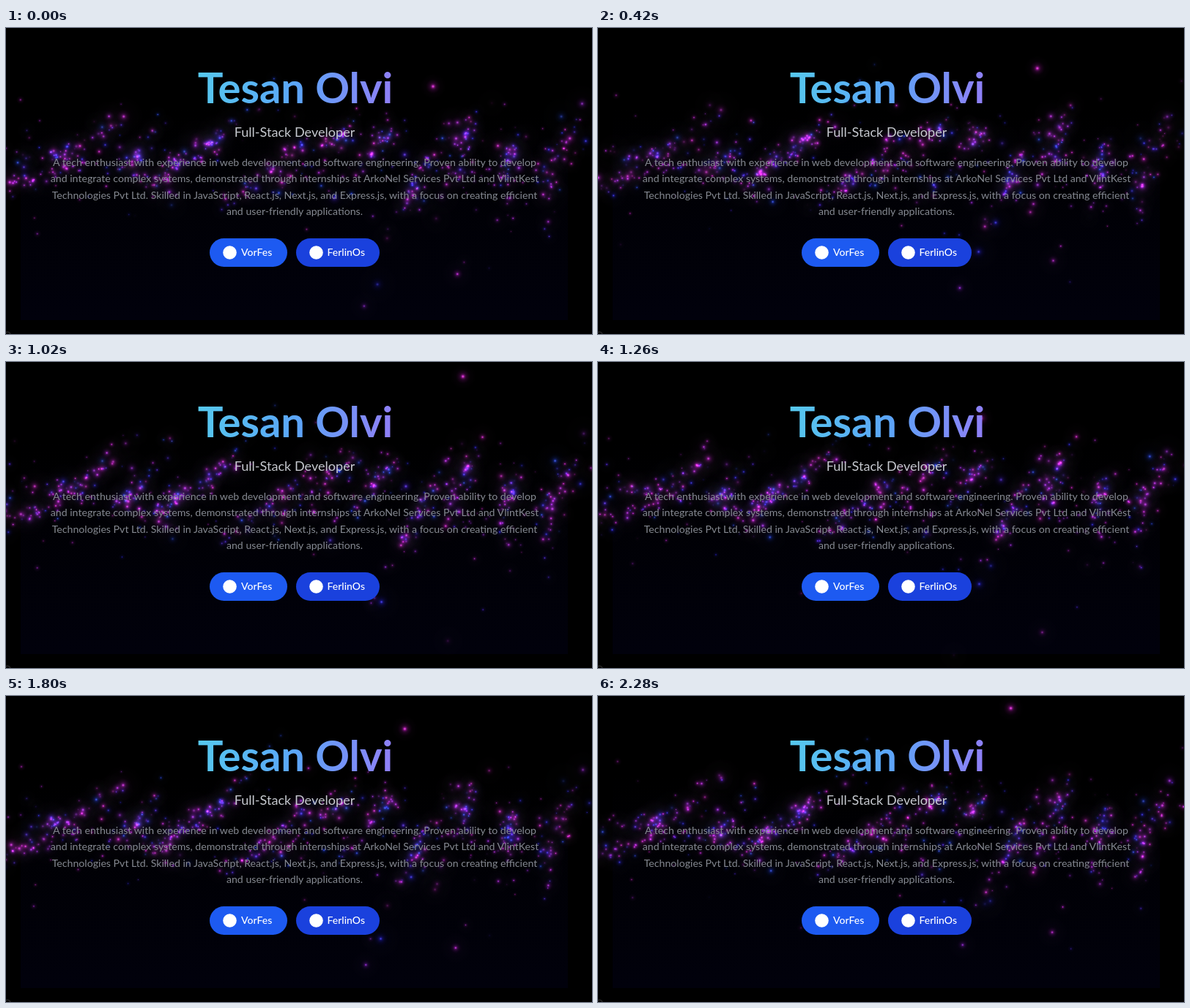
Recreate the animation shown at these times as an HTML page with a canvas. Size 800 by 419 pixels, loop 2.52 s.

```html
<!DOCTYPE html>
<html lang="en">
<head>
<meta charset="utf-8">
<title>Developer hero</title>
<style>
  html, body { margin: 0; width: 100%; height: 100%; overflow: hidden; background: #000; }
  canvas, svg { position: absolute; left: 0; top: 0; width: 800px; height: 419px; display: block; }
  text { font-family: Lato, "Open Sans", sans-serif; }
  .title { font-size: 58px; font-weight: 700; fill: url(#ink); }
  .role { font-size: 18.1px; fill: #c6c9cf; }
  .about { font-size: 14.15px; fill: #858991; }
  .label { font-size: 14px; font-weight: 500; fill: #fff; }
  .mid { text-anchor: middle; }
</style>
</head>
<body>
<canvas id="sky" width="800" height="419"></canvas>
<svg viewBox="0 0 800 419">
  <defs>
    <linearGradient id="ink" gradientUnits="userSpaceOnUse" x1="262" y1="70" x2="528" y2="95">
      <stop offset="0" stop-color="#56c8ee"/>
      <stop offset=".5" stop-color="#5ba6f8"/>
      <stop offset="1" stop-color="#907ff7"/>
    </linearGradient>
  </defs>
  <text class="title mid" x="395" y="103">Tesan Olvi</text>
  <text class="role mid" x="394" y="149">Full-Stack Developer</text>
  <g class="about mid">
    <text x="394" y="189">A tech enthusiast with experience in web development and software engineering. Proven ability to develop</text>
    <text x="394" y="211">and integrate complex systems, demonstrated through internships at ArkoNel Services Pvt Ltd and VlintKest</text>
    <text x="394" y="234">Technologies Pvt Ltd. Skilled in JavaScript, React.js, Next.js, and Express.js, with a focus on creating efficient</text>
    <text x="394" y="256">and user-friendly applications.</text>
  </g>
  <rect x="278" y="288" width="106" height="39" rx="19.5" fill="#1d5af1"/>
  <rect x="396" y="288" width="114" height="39" rx="19.5" fill="#1a41dd"/>
  <circle cx="305.5" cy="307.5" r="9.3" fill="#fff"/>
  <circle cx="423.5" cy="307.5" r="9.3" fill="#fff"/>
  <text class="label" x="321" y="312">VorFes</text>
  <text class="label" x="438.5" y="312">FerlinOs</text>
  <circle cx="2" cy="420" r="4" fill="none" stroke="#333"/>
</svg>
<script>
const LOOP = 2520, STEP = 60, LAST = 38;
const STREAMS = 12, PER_STREAM = 44, STRAYS = 90;
const ctx = document.getElementById('sky').getContext('2d');

let seed = 71;
const rand = () => {
  seed = (seed * 16807) % 2147483647;
  return seed / 2147483647;
};
const spread = () => rand() + rand() + rand() - 1.5;

function makeGlow(hue) {
  const c = document.createElement('canvas');
  c.width = c.height = 64;
  const g = c.getContext('2d');
  const fill = g.createRadialGradient(32, 32, 0, 32, 32, 32);
  const tint = (light, alpha) => `hsla(${hue},80%,${light}%,${alpha})`;
  fill.addColorStop(0, tint(66, .95));
  fill.addColorStop(.12, tint(54, .75));
  fill.addColorStop(.25, tint(46, .32));
  fill.addColorStop(.5, tint(40, .12));
  fill.addColorStop(1, tint(34, 0));
  g.fillStyle = fill;
  g.fillRect(0, 0, 64, 64);
  return c;
}
const pinks = [0, 1, 2, 3].map(i => makeGlow(280 + 8 * i));
const blues = [0, 1, 2].map(i => makeGlow(230 + 12 * i));
const pick = list => list[Math.floor(rand() * list.length)];

// Streams turn from a shallow valley on the left to steep falls on the right
function streamPoint(k, u) {
  const c = (k + .3) / STREAMS;
  const mid = 185 + 25 * Math.cos(2.4 * k);
  const bend = 50 * Math.sin(2 * Math.PI * c);
  return [
    800 * c + (95 - 75 * c) * u + 8 * Math.sin(3 * u + k),
    mid - (20 + 85 * c) * u - bend * u * u
  ];
}

const look = () => ({
  glow: pick(rand() < .68 ? pinks : blues),
  size: 8 + 11 * rand() ** 2,
  life: 800 + 1300 * rand(),
  phase: rand()
});

const sparks = [];
for (let k = 0; k < STREAMS; k++) {
  for (let i = 0; i < PER_STREAM; i++) {
    const wide = rand() < .3 ? 34 : 11;
    sparks.push({ ...look(), k, u: spread() * .85, dx: spread() * wide, dy: spread() * wide });
  }
}
for (let i = 0; i < STRAYS; i++) {
  sparks.push({ ...look(), x: rand() * 800, y: 195 + spread() * 120, size: 6 + 6 * rand() });
}

// Two brighter sparks climb out of the top, one after the other
const climbers = [
  { from: 0, to: 1140, x: 583, y: 80 },
  { from: 1140, to: LOOP, x: 518, y: 84 }
];

function stamp(glow, x, y, size, alpha) {
  ctx.globalAlpha = alpha;
  ctx.drawImage(glow, x - size / 2, y - size / 2, size, size);
}

function draw(ms) {
  ctx.globalCompositeOperation = 'source-over';
  ctx.globalAlpha = 1;
  ctx.fillStyle = '#000';
  ctx.fillRect(0, 0, 800, 419);
  const shade = ctx.createLinearGradient(0, 110, 0, 400);
  shade.addColorStop(0, '#000');
  shade.addColorStop(1, '#01010c');
  ctx.fillStyle = shade;
  ctx.fillRect(20, 110, 747, 290);
  ctx.globalCompositeOperation = 'lighter';

  for (const s of sparks) {
    const p = (ms / s.life + s.phase) % 1;
    const alpha = .85 * Math.sin(Math.PI * p) ** .7;
    if ('k' in s) {
      const [x, y] = streamPoint(s.k, s.u + (p - .5) * .5);
      stamp(s.glow, x + s.dx, y + s.dy, s.size, alpha);
      stamp(s.glow, x + s.dx, y + s.dy, s.size * 2.8, alpha * .14);
    } else {
      stamp(s.glow, s.x + 20 * p, s.y - 25 * p, s.size, alpha * .75);
    }
  }
  for (const { from, to, x, y } of climbers) {
    if (ms < from || ms >= to) continue;
    const t = (ms - from) / 1000;
    stamp(pinks[3], x + 40 * t, y - 59 * t, 20, .8);
    stamp(pinks[2], x + 40 * t, y - 59 * t, 34, .25);
  }
}

let shown = -1;
function tick() {
  const step = Math.min(LAST, Math.floor((performance.now() % LOOP) / STEP));
  if (step !== shown) draw((shown = step) * STEP);
  requestAnimationFrame(tick);
}
tick();
</script>
</body>
</html>
```
